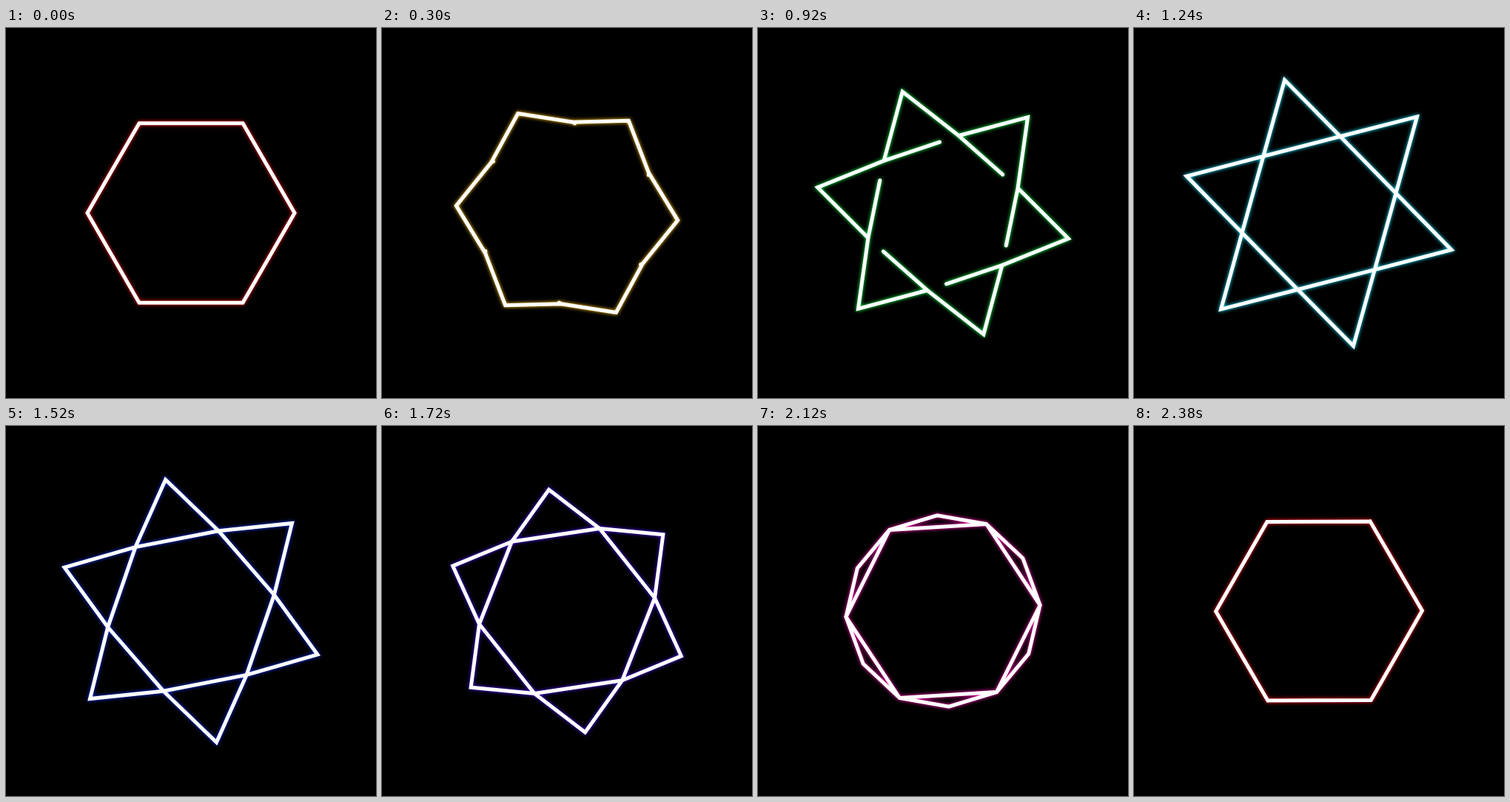
Recreate the animation shown at these times as an HTML page with a canvas. Size 500x500 px, loop 2.4 s.

```html
<!DOCTYPE html>
<html lang="en">
<head>
<meta charset="utf-8">
<title>Hexagon star loop</title>
<style>
  html, body { margin: 0; width: 100%; height: 100%; overflow: hidden; background: #000; }
  canvas { display: block; width: 500px; height: 500px; }
</style>
</head>
<body>
<canvas id="stage" width="500" height="500"></canvas>
<script>
const ctx = document.getElementById('stage').getContext('2d');
const LOOP = 2400;
const RADIUS = 140;
const COS30 = Math.sqrt(3) / 2;
const STEP = Math.PI / 3;

const smooth = p => p * p * (3 - 2 * p);
const polar = (r, a) => [250 + r * Math.cos(a), 250 + r * Math.sin(a)];
const mix = (a, b, u) => a.map((v, i) => v + (b[i] - v) * u);

// Radii of the star's tips and inner joints, and how far the inner sides have grown.
function pose(t) {
  const zoom = RADIUS * Math.pow(3, t / 2);
  if (t < 0.5) {
    const e = smooth(t * 2);
    return { tip: zoom, joint: zoom * (COS30 - e * COS30 / 3), grown: e * e };
  }
  const e = smooth(t * 2 - 1);
  const joint = zoom / Math.sqrt(3);
  return { tip: joint * COS30 * (2 - e), joint, grown: 1 };
}

function draw(t) {
  const { tip, joint, grown } = pose(t);
  const turn = t * Math.PI / 6;
  const tipAt = i => polar(tip, turn + i * STEP);
  const jointAt = i => polar(joint, turn + (i + 0.5) * STEP);

  ctx.shadowColor = 'transparent';
  ctx.fillStyle = '#000';
  ctx.fillRect(0, 0, 500, 500);

  ctx.beginPath();
  for (let i = 0; i < 6; i++) {
    ctx.moveTo(...jointAt(i - 1));
    ctx.lineTo(...tipAt(i));
    ctx.lineTo(...jointAt(i));
  }
  if (grown < 1) {
    for (let i = 0; i < 6; i++) {
      ctx.moveTo(...jointAt(i));
      ctx.lineTo(...mix(jointAt(i), jointAt(i + 1), grown));
    }
  } else {
    ctx.moveTo(...jointAt(0));
    for (let i = 1; i < 6; i++) ctx.lineTo(...jointAt(i));
    ctx.closePath();
  }

  ctx.lineWidth = 5;
  ctx.lineCap = 'round';
  ctx.lineJoin = 'miter';
  ctx.strokeStyle = '#fff';
  ctx.shadowBlur = 5;
  ctx.shadowColor = `hsl(${t * 360}, 100%, 50%)`;
  ctx.stroke();
}

const start = performance.now();
function tick() {
  draw((performance.now() - start) % LOOP / LOOP);
  requestAnimationFrame(tick);
}
tick();
</script>
</body>
</html>
```
